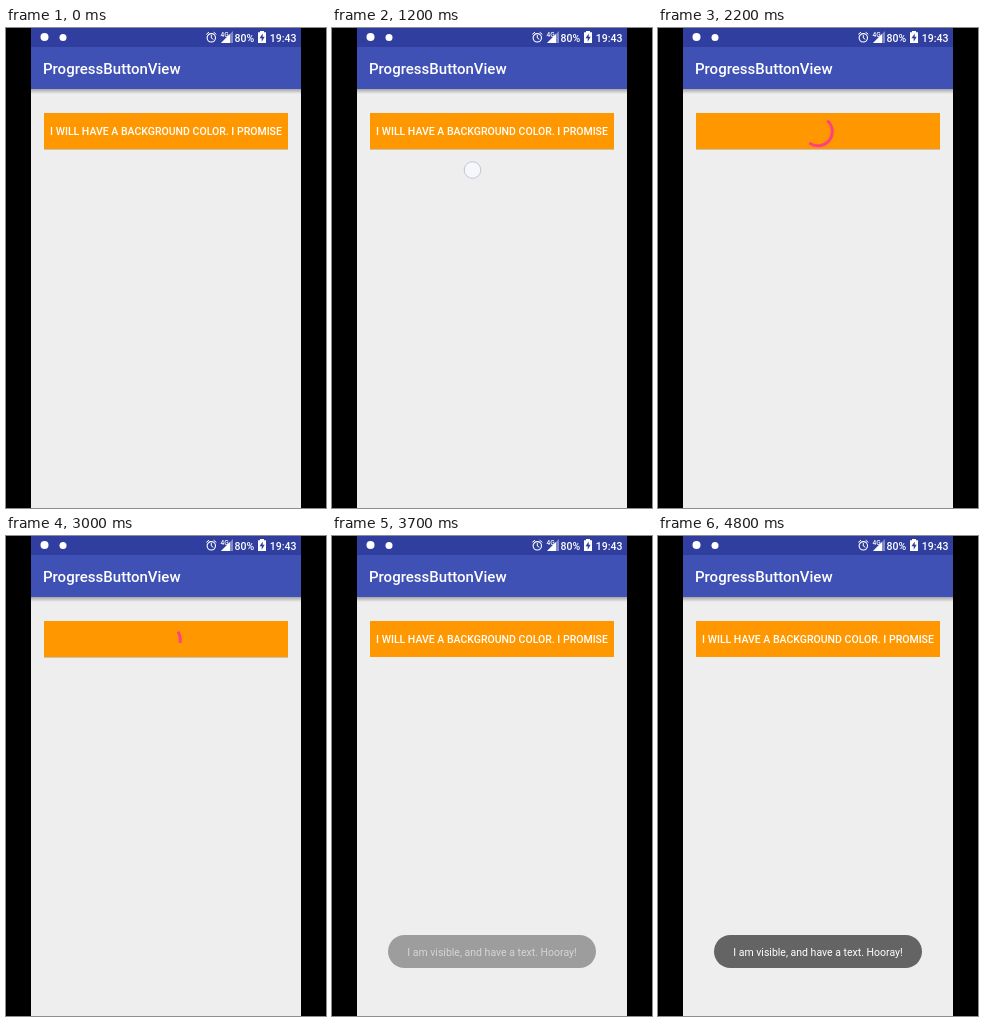
Recreate the animation shown at these times as an HTML page with a canvas. Size 320x480 px, loop 4900 ms.

```html
<!DOCTYPE html>
<html>
<head>
<meta charset="utf-8">
<style>
  html, body { margin: 0; width: 100%; height: 100%; overflow: hidden; background: #000; }
  canvas { display: block; }
</style>
</head>
<body>
<canvas width="320" height="480"></canvas>
<script>
const ctx = document.querySelector('canvas').getContext('2d');
const LOOP = 4900, STEP = 100;
const CYCLE = 1333, SPIN_START = 1935;

const clamp = v => Math.max(0, Math.min(1, v));
const mix = (a, b, k) => a + (b - a) * k;

// Cubic Bézier easing from (0,0) to (1,1) with control points (x1,0) and (x2,1)
function ease(x, x1, x2) {
  x = clamp(x);
  let lo = 0, hi = 1, s = x;
  for (let i = 0; i < 20; i++) {
    s = (lo + hi) / 2;
    const px = 3 * (1 - s) ** 2 * s * x1 + 3 * (1 - s) * s * s * x2 + s ** 3;
    if (px < x) lo = s; else hi = s;
  }
  return s * s * (3 - 2 * s);
}

function rect(x, y, w, h, color) {
  ctx.fillStyle = color;
  ctx.fillRect(x, y, w, h);
}

function text(str, x, y, size, weight = 500, align = 'left') {
  ctx.font = `${weight} ${size}px Roboto, sans-serif`;
  ctx.textAlign = align;
  ctx.fillStyle = '#fff';
  ctx.fillText(str, x, y);
}

function disc(x, y, r, fill, stroke) {
  ctx.beginPath();
  ctx.arc(x, y, r, 0, 2 * Math.PI);
  ctx.fillStyle = fill;
  ctx.fill();
  if (stroke) {
    ctx.strokeStyle = stroke;
    ctx.lineWidth = 1;
    ctx.stroke();
  }
}

function shape(path, color) {
  ctx.fillStyle = color;
  ctx.fill(new Path2D(path));
}

function line(path, width) {
  ctx.strokeStyle = '#fff';
  ctx.lineWidth = width;
  ctx.stroke(new Path2D(path));
}

function shadow(y, h, alpha) {
  const g = ctx.createLinearGradient(0, y, 0, y + h);
  g.addColorStop(0, `rgba(0,0,0,${alpha})`);
  g.addColorStop(1, 'rgba(0,0,0,0)');
  rect(25, y, 270, h, g);
}

function statusBar() {
  rect(25, 0, 270, 19, '#303f9f');
  disc(38.5, 9, 4, '#fff');
  disc(57, 9.5, 3.5, '#fff');

  // Alarm clock
  ctx.beginPath();
  ctx.arc(205.3, 9.8, 4.2, 0, 2 * Math.PI);
  ctx.strokeStyle = '#fff';
  ctx.lineWidth = 1.1;
  ctx.stroke();
  line('M205.3 7V10L207.3 11.3M200.3 6.3L203 4.2M210.3 6.3L207.6 4.2', 1);

  // Signal
  shape('M227 3V15H215Z', 'rgba(255,255,255,.4)');
  shape('M224 6V15H215Z', '#fff');
  text('4G', 214.5, 8.5, 6.5);

  text('80%', 228.5, 13.5, 10.5);

  // Charging battery
  shape('M252 4.3H254V3H258V4.3H260V15H252Z', '#fff');
  shape('M256.7 5.5L253.5 10.3H255.7V13.7L258.7 8.8H256.7Z', '#303f9f');

  text('19:43', 290.5, 13.5, 10.5, 500, 'right');
}

function spinner(t) {
  const p = (t - SPIN_START) / CYCLE;
  if (p < 0) return;
  const n = Math.floor(p), f = p - n;
  const base = -90 + 144 * p + 90 * f;
  const start = base + 270 * ease(f * 2 - 1, 0.4, 0.2);
  const end = base + 270 * ease(f * 2, 0.4, 0.2);
  ctx.beginPath();
  ctx.arc(160, 103.5, 14.3, start * Math.PI / 180, (end + 0.5) * Math.PI / 180);
  ctx.lineCap = 'square';
  ctx.lineWidth = 3;
  ctx.strokeStyle = '#ff4081';
  ctx.stroke();
  ctx.lineCap = 'butt';
}

function button(t) {
  if (t < 3500) rect(38, 121, 244, 1, '#c9c2b6');
  rect(38, 85, 244, 36, '#ff9800');
  if (t >= 1900 && t < 3500) spinner(t);
  else text('I WILL HAVE A BACKGROUND COLOR. I PROMISE', 160, 107, 10.5, 500, 'center');
}

function pointer(t) {
  if (t < 900 || t >= 1700) return;
  const k = clamp((t - 900) / 500);
  disc(140.5, mix(207, 98.7, k), 8.3, '#f6f7fa', '#c3c6da');
}

function toast(t) {
  const u = clamp((t - 3560) / 400);
  if (!u) return;
  ctx.globalAlpha = 1 - (1 - u) ** 2;
  ctx.beginPath();
  ctx.roundRect(56, 399, 208, 33, 16.5);
  ctx.fillStyle = '#646464';
  ctx.fill();
  text('I am visible, and have a text. Hooray!', 160, 419.5, 10.5, 400, 'center');
  ctx.globalAlpha = 1;
}

function draw(now) {
  const t = Math.floor(now % LOOP / STEP) * STEP;
  rect(0, 0, 320, 480, '#000');
  rect(25, 0, 270, 480, '#eee');
  shadow(61, 5, 0.3);
  rect(25, 19, 270, 42, '#3f51b5');
  statusBar();
  text('ProgressButtonView', 37, 46, 15);
  button(t);
  pointer(t);
  toast(t);
  requestAnimationFrame(draw);
}
requestAnimationFrame(draw);
</script>
</body>
</html>
```
